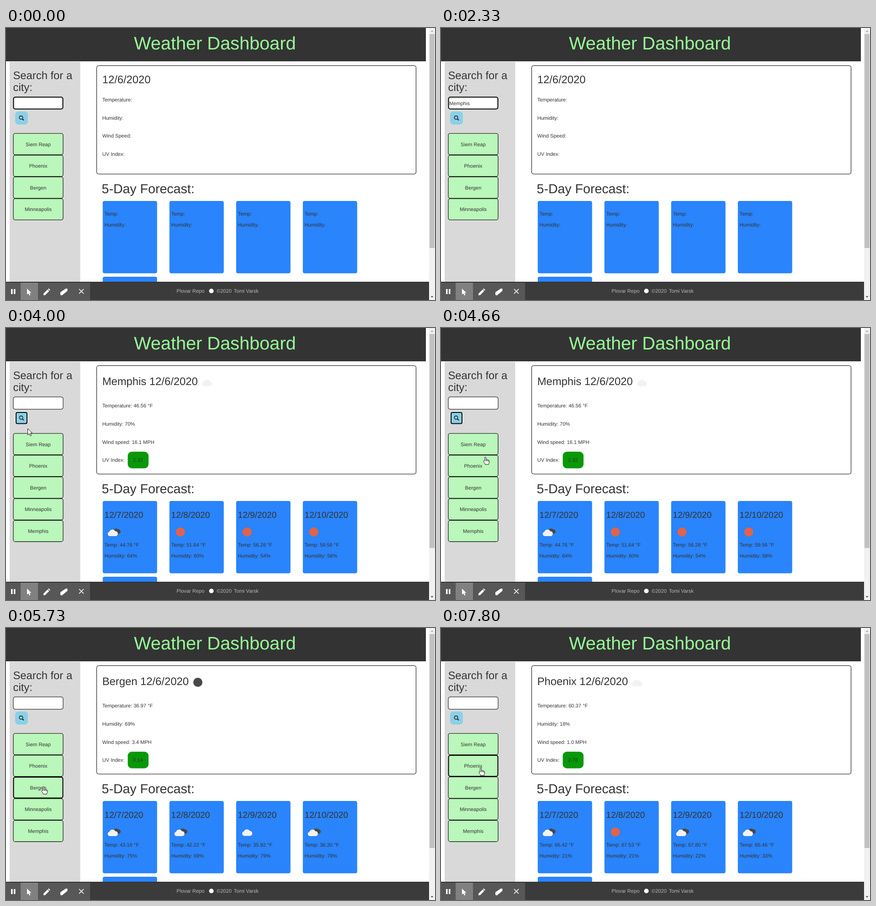
Animation, 939 px wide and 596 px high, one loop 8 s. Source, as an HTML page:

```html
<!DOCTYPE html>
<html lang="en">
<head>
<meta charset="utf-8">
<title>Weather Dashboard</title>
<style>
  html, body { margin: 0; width: 100%; height: 100%; overflow: hidden; background: #fff; }
  svg { display: block; }
  text { font-family: "Liberation Sans", Arial, sans-serif; fill: #333; text-rendering: geometricPrecision; white-space: pre; }
</style>
</head>
<body>
<svg width="939" height="596" viewBox="0 0 939 596">
  <defs>
    <path id="cloud" d="M-6.5 8.5A5 5 0 0 1-7-1.2A7.2 7.2 0 0 1 5.8-2.4A5.5 5.5 0 0 1 7 8.5Z"/>
    <g id="few"><use href="#cloud" fill="#f2f2f2"/></g>
    <g id="broken">
      <path d="M0-3A5.6 5.6 0 0 1 9.5-6A4.3 4.3 0 0 1 11 4H2Z" fill="#484848"/>
      <use href="#cloud" fill="#f2f2f2" x="-2.3" y=".6"/>
    </g>
    <circle id="sun" r="10" fill="#e2624b"/>
    <circle id="night" r="10" fill="#48484a"/>
    <path id="hand" d="M-1.3 8.3V.8C-1.3-.9 1.4-.9 1.4.8V5.2C2.2 4.5 3.9 4.8 4 6C4.8 5.3 6.4 5.6 6.5 6.9C7.4 6.4 8.5 7 8.5 8.2V11C8.5 13 7.2 13.6 7.2 16H-.4C-.4 13.8-3.9 11-3.9 9C-3.9 7.6-2.2 7.3-1.3 8.3ZM1.4 5.2V9M4 6V9M6.5 7V9.5"
      fill="#fff" stroke="#111" stroke-width="1" stroke-linejoin="round"/>
    <path id="arrow" d="M0 0V14L3.3 11L5.6 16L8 15L5.8 10H10Z" fill="#fff" stroke="#111"/>
  </defs>
  <g id="page"></g>
  <g id="live"></g>
</svg>
<script>
const LOOP = 8000, SMALL = 11.1, HEAD = 23.8, LEFT = 210.7;
const page = document.getElementById('page'), live = document.getElementById('live');
const pen = document.createElement('canvas').getContext('2d');

const text = (x, y, str, size = SMALL, attrs = '') =>
  `<text x="${x}" y="${y}" font-size="${size}" ${attrs}>${str}</text>`;
const rect = (x, y, w, h, fill, r = 0, attrs = '') =>
  `<rect x="${x}" y="${y}" width="${w}" height="${h}" rx="${r}" fill="${fill}" ${attrs}/>`;
const icon = (name, x, y) => `<use href="#${name}" x="${x}" y="${y}"/>`;
const path = (d, attrs) => `<path d="${d}" ${attrs}/>`;
const textWidth = (str, size) => {
  pen.font = `${size}px "Liberation Sans", Arial, sans-serif`;
  return pen.measureText(str).width;
};
// Rounded box whose border lies inside its bounds
const bordered = (x, y, w, h, fill, line, r = 4) =>
  rect(x + line / 2, y + line / 2, w - line, h - line, fill, r, `stroke="#000" stroke-width="${line}"`);

const reports = {
  Memphis: {
    now: ['few', '46.56', 70, '16.1', '2.32'],
    days: [['broken', '44.76', 64], ['sun', '51.64', 60], ['sun', '56.28', 54], ['sun', '59.56', 58]]
  },
  Bergen: {
    now: ['night', '36.97', 69, '3.4', '0.14'],
    days: [['broken', '43.16', 75], ['broken', '42.22', 69], ['few', '35.92', 79], ['broken', '36.30', 78]]
  },
  Phoenix: {
    now: ['few', '60.37', 18, '1.0', '2.78'],
    days: [['broken', '66.42', 21], ['sun', '67.53', 21], ['broken', '67.80', 22], ['broken', '65.46', 33]]
  }
};
const cities = ['Siem Reap', 'Phoenix', 'Bergen', 'Minneapolis', 'Memphis'];
const keyTimes = [930, 1060, 1130, 1260, 1460, 1530, 1800];
const clicks = [
  { at: 2930, focus: 'search' },
  { at: 5260, focus: 'Bergen' },
  { at: 6800, focus: 'Phoenix' }
];
const SUBMIT = 3000, ICONS = 3600, RING = 265;
const loads = [[3270, 'Memphis'], [5600, 'Bergen'], [7200, 'Phoenix']];
const pointer = [
  [2460, 92, 186], [2660, 42, 196], [2860, 33, 198], [3860, 33, 198], [4200, 72, 258],
  [4400, 72, 258], [4660, 97, 283], [5200, 82, 348], [6060, 82, 348], [6530, 86, 305],
  [7700, 86, 305], [7800, 87, 307]
];
const latest = (list, t, time) => list.filter(item => time(item) <= t).pop();

function drawPage() {
  const white = 'fill="#fff"';
  page.innerHTML =
    rect(0, 0, 919, 73, '#333') +
    text(280, 47, 'Weather Dashboard', 39.7, 'style="fill:#98fb98"') +
    rect(8, 74, 154.5, 483, '#d9d9d9') +
    text(15.5, 112, 'Search for a', HEAD) + text(15.5, 138, 'city:', HEAD) +
    bordered(198, 82, 700, 238.5, '#fff', 1) +
    text(209.5, 361.5, '5-Day Forecast:', 28.55) +
    [0, 1, 2, 3].map(i => rect(211.7 + i * 146, 379, 119, 158.5, '#2a84fb', 4)).join('') +
    rect(211.7, 545, 119, 30, '#2a84fb', 4) +
    rect(0, 556, 926, 40, '#3b3b3b') + rect(0, 556, 926, 1.5, '#303030') +
    text(373.3, 580, 'Plovar Repo', SMALL, 'style="fill:#b8b8b8"') +
    '<circle cx="449.5" cy="576.3" r="5" fill="#fff"/>' +
    text(461, 580, '©2020', SMALL, 'style="fill:#b8b8b8"') +
    text(498.8, 580, 'Tomi Varsk', SMALL, 'style="fill:#b8b8b8"') +
    // Recorder toolbar
    rect(0, 558, 184, 38, '#575757') + rect(32, 558, 38, 38, '#808080') +
    rect(11, 572, 3.5, 11, '#fff') + rect(17, 572, 3.5, 11, '#fff') +
    path('M46 571V584L49 581.5L51.2 586L53.5 585L51.4 580.5H55.5Z', white) +
    path('M82 585.5V582L91 573L94.5 576.5L85.5 585.5ZM92 572L93.5 570.5L97 574L95.5 575.5Z', white) +
    path('M119 579L130 571.5Q134 570 134.5 572V576L123 585.5Q119 586.5 119 584Z', white) +
    path('M160 572L170 582M170 572L160 582', 'stroke="#fff" stroke-width="1.7"') +
    // Scrollbar
    rect(926, 0, 13, 596, '#f1f1f1') + rect(927, 13, 11, 469, '#c1c1c1') +
    path('M929.5 8.5L932.5 5L935.5 8.5Z', 'fill="#a3a3a3"') +
    path('M929.5 587.5L932.5 591L935.5 587.5Z', 'fill="#505050"');
}

function drawSearch(t, focus) {
  const typed = t < SUBMIT ? 'Memphis'.slice(0, keyTimes.filter(k => k <= t).length) : '';
  const caret = (t >= 200 && t < 730) || (t >= 930 && t < 2330);
  const active = focus === 'search';
  return bordered(15.5, 150.5, 110, 28, '#fff', focus === 'input' ? 2 : 1) +
    text(18, 168.7, typed) +
    (caret ? rect(18 + textWidth(typed, SMALL), 158, 1, 13, '#333') : '') +
    (active
      ? rect(20, 183, 28, 28, '#fff', 5) + bordered(21, 184, 26, 26.5, '#8ad0e8', 2, 3)
      : rect(20, 183, 28, 28.5, '#8ad0e8', 7)) +
    '<circle cx="33" cy="196.3" r="3.7" fill="none" stroke="#222" stroke-width="1.6"/>' +
    path('M35.7 199L39 202.3', 'stroke="#222" stroke-width="2.1"');
}

function drawCities(t, focus) {
  return cities.slice(0, t < SUBMIT ? 4 : 5).map((city, i) => {
    const y = 230.5 + i * 47.6;
    return bordered(15.5, y, 110, 47.8, '#baf7ba', city === focus ? 2 : 1.1) +
      text(70.5, y + 28, city, SMALL, 'text-anchor="middle"');
  }).join('');
}

function drawReport(t) {
  const load = latest(loads, t, l => l[0]);
  const city = load && load[1], full = t >= ICONS;
  const [sky, temp, humidity, wind, uv] = city ? reports[city].now : [];
  const title = (city ? city + ' ' : '') + '12/6/2020';
  const lines = city
    ? [`Temperature: ${temp} °F`, `Humidity: ${humidity}%`, `Wind speed: ${wind} MPH`, 'UV Index:']
    : ['Temperature:', 'Humidity:', 'Wind Speed:', 'UV Index:'];
  let out = text(LEFT, full ? 125.2 : 120.5, title, HEAD) +
    lines.map((line, i) => text(LEFT, (full ? 174.3 : 161) + i * 39.65, line)).join('');
  if (full) {
    out += icon(sky, LEFT + textWidth(title, HEAD) + 20, 119) +
      rect(266.5, 271, 45.5, 36.5, '#089808', 9) + text(278, 293.3, uv);
  }
  for (let i = 0; i < 4; i++) {
    const x = 215.6 + i * 146, y = full ? 479 : city ? 455.2 : 411;
    const [look, dayTemp, dayHumidity] = city ? reports[city].days[i] : [];
    if (city) out += text(x, 415.6, `12/${7 + i}/2020`, 19.05);
    if (full) out += icon(look, x + 20, 447);
    out += text(x, y, city ? `Temp: ${dayTemp} °F` : 'Temp:') +
      text(x, y + 23.8, city ? `Humidity: ${dayHumidity}%` : 'Humidity:');
  }
  return out;
}

function pointerAt(t) {
  const next = pointer.findIndex(p => p[0] > t);
  if (next < 0) return pointer[pointer.length - 1].slice(1);
  const [t0, x0, y0] = pointer[next - 1], [t1, x1, y1] = pointer[next];
  const u = (t - t0) / (t1 - t0), ease = u * u * (3 - 2 * u);
  return [x0 + (x1 - x0) * ease, y0 + (y1 - y0) * ease];
}

function drawPointer(t, click) {
  if (t < pointer[0][0]) return '';
  const [x, y] = pointerAt(t);
  const age = click ? (t - click.at) / RING : 1;
  const ring = age < 1
    ? `<circle cx="${x}" cy="${y + 1}" r="25.7" fill="none" stroke="#d23c46" stroke-width="3" opacity="${0.8 * (1 - age * age)}"/>`
    : '';
  const clickable = y > 231 || (x > 20 && x < 48 && y > 183 && y < 211);
  return ring + icon(clickable ? 'hand' : 'arrow', x, y);
}

function frame() {
  const t = performance.now() % LOOP;
  const click = latest(clicks, t, c => c.at);
  const focus = click ? click.focus : 'input';
  live.innerHTML = drawSearch(t, focus) + drawCities(t, focus) + drawReport(t) + drawPointer(t, click);
  requestAnimationFrame(frame);
}

drawPage();
frame();
</script>
</body>
</html>
```
